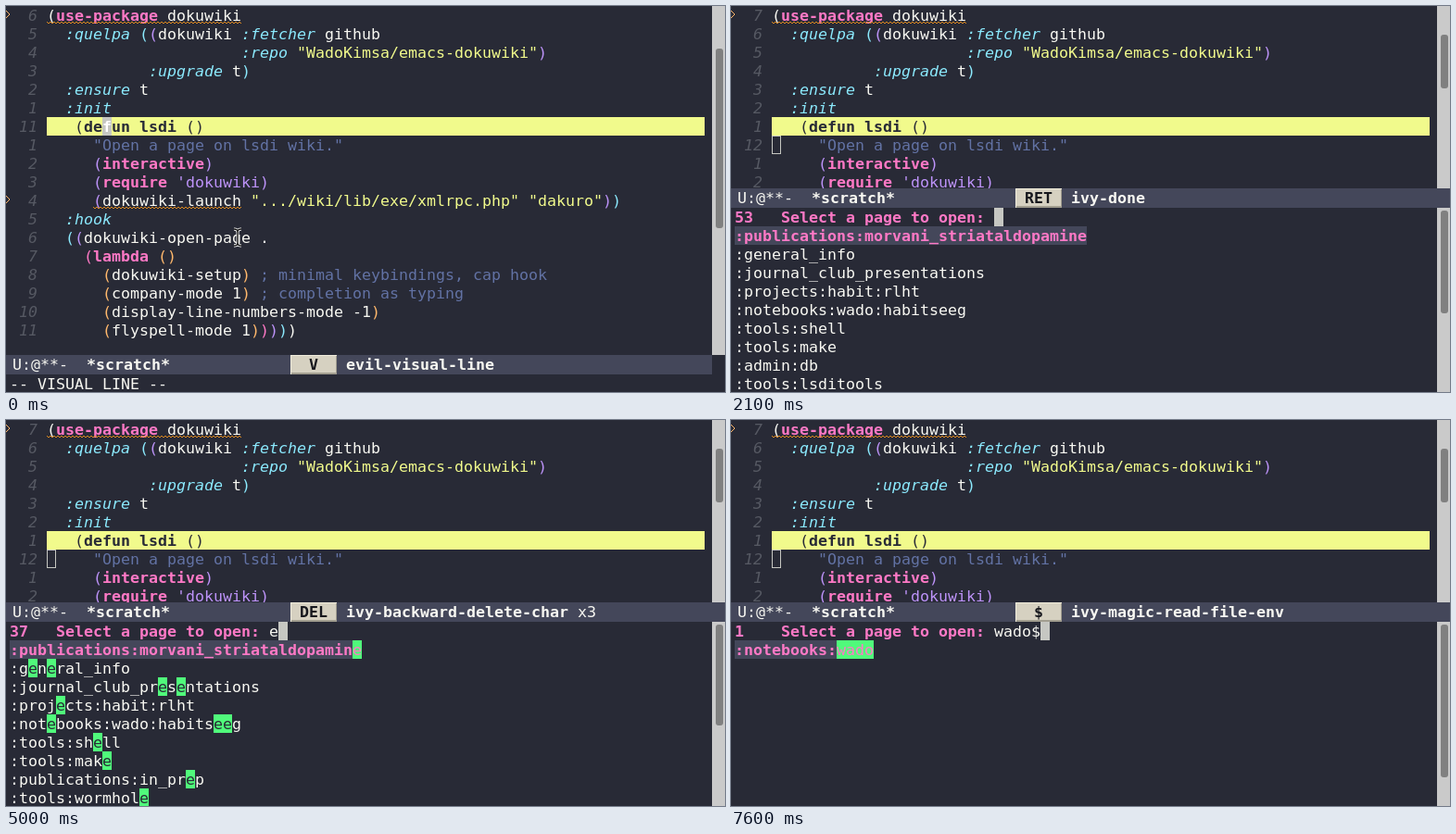
These frames come from a looping animation (776x417 px, 8 s). An HTML page with a canvas:

```html
<!DOCTYPE html>
<html lang="en">
<head>
<meta charset="utf-8">
<title>Wiki pages from the editor</title>
<style>
  html, body { margin: 0; width: 776px; height: 417px; overflow: hidden; background: #282a36; }
  canvas { display: block; }
</style>
</head>
<body>
<canvas id="stage" width="776" height="417"></canvas>
<script>
const ctx = document.getElementById('stage').getContext('2d');
const LOOP = 8000, CELL = 10, ROW = 20;
const C = {
  bg: '#282a36', fg: '#f8f8f2', line: '#44475a', pink: '#ff79c6', cyan: '#8be9fd',
  purple: '#bd93f9', orange: '#ffb86c', yellow: '#f1fa8c', green: '#50fa7b',
  comment: '#6272a4', number: '#565963', cursor: '#c6c7c2', wave: '#e08a1e'
};
const RAINBOW = [C.fg, C.cyan, C.purple, C.pink, C.orange];

const code = `(use-package dokuwiki
  :quelpa ((dokuwiki :fetcher github
                     :repo "WadoKimsa/emacs-dokuwiki")
           :upgrade t)
  :ensure t
  :init
   (defun lsdi ()
     "Open a page on lsdi wiki."
     (interactive)
     (require 'dokuwiki)
     (dokuwiki-launch ".../wiki/lib/exe/xmlrpc.php" "dakuro"))
  :hook
  ((dokuwiki-open-page .
    (lambda ()
      (dokuwiki-setup) ; minimal keybindings, cap hook
      (company-mode 1) ; completion as typing
      (display-line-numbers-mode -1)
      (flyspell-mode 1)))))`.split('\n');
const REGION = 6, DOC = 7;

const commands = `lh-knight/body
lispy-beginning-of-defun
lispy--ediff-regions
lispy-splice
lispy-raise-some
lispy-unbind-variable
lsp-signature-stop
lispy-describe-bindings-C-4
lispy-mark-symbol (M-m)
lispy-describe-inline
lsp-describe-session
lsp-find-definition
lsp-find-declaration
lsp-describe-thing-at-point
lsdi`.split('\n');

const pages = `:publications:morvani_striataldopamine
:general_info
:journal_club_presentations
:projects:habit:rlht
:notebooks:wado:habitseeg
:tools:shell
:tools:make
:admin:db
:tools:lsditools
:publications:in_prep
:tools:wormhole
:admin:website:wiki
:wiki:dokuwiki
:wiki:syntax
:admin:website:wordpress
:admin:website
:notebooks:wado:zilonk_bastovary_eyetracking_in_quorba
:notebooks:wado
:wiki:welcome`.split('\n');

const SELF = 'self-insert-command', DEL = 'ivy-backward-delete-char';
const step = (time, key, command, extra) => ({ time, key, command, ...extra });
const pick = (time, key, command, prompt, query, count, thumb, repeat = '') =>
  step(time, key, command, { prompt, query, count, thumb, repeat });
const MX = 'M-x ', OPEN = 'Select a page to open: ';
const HOST = 'Contacting host: wiki.example:443';

const steps = [
  step(0, 'V', 'evil-visual-line', { echo: '-- VISUAL LINE --' }),
  pick(600, 'M-x', 'counsel-M-x', MX, '^', 7351, 334),
  pick(900, 'l', SELF, MX, '^l', 402, 336),
  pick(1000, 's', SELF, MX, '^ls', 316, 335),
  pick(1100, 'd', SELF, MX, '^lsd', 87, 333),
  pick(1200, 'i', SELF, MX, '^lsdi', 46, 331),
  step(1600, 'i', SELF, { message: '', thumb: 331 }),
  step(1700, 'i', SELF, { message: HOST, thumb: 331 }),
  step(1900, 'RET', 'ivy-done', { echo: HOST }),
  step(2000, 'RET', 'ivy-done', { echo: '' }),
  pick(2100, 'RET', 'ivy-done', OPEN, '', 53, 332),
  pick(3900, 'e', SELF, OPEN, 'e', 37, 330),
  pick(4000, 'm', SELF, OPEN, 'em', 0, 396),
  pick(4200, 'a', SELF, OPEN, 'ema', 0, 396),
  pick(4300, 'c', SELF, OPEN, 'emac', 0, 396),
  pick(4700, 'DEL', DEL, OPEN, 'ema', 0, 396),
  pick(4900, 'DEL', DEL, OPEN, 'em', 0, 396, 'x2'),
  pick(5000, 'DEL', DEL, OPEN, 'e', 37, 330, 'x3'),
  pick(5200, 'DEL', DEL, OPEN, '', 53, 332, 'x4'),
  pick(6400, 'w', SELF, OPEN, 'w', 10, 328),
  pick(6600, 'a', SELF, OPEN, 'wa', 3, 354),
  pick(6700, 'd', SELF, OPEN, 'wad', 3, 354),
  pick(7300, 'o', SELF, OPEN, 'wado', 3, 355),
  pick(7600, '$', 'ivy-magic-read-file-env', OPEN, 'wado$', 1, 386)
];
const blinkOff = [[400, 600], [3700, 3900], [5600, 6200]];

function box(color, x, y, w, h) {
  ctx.fillStyle = color;
  ctx.fillRect(x, y, w, h);
}

// Writes text on the character grid; y is the top of the row.
function put(text, x, y, color = C.fg, style = '') {
  ctx.font = `${style} 16.6px "DejaVu Sans Mono", "Noto Sans Mono", monospace`;
  ctx.fillStyle = color;
  [...text].forEach((ch, i) => ch !== ' ' && ctx.fillText(ch, x + i * CELL, y + 16));
}

function wave(x0, x1, y) {
  ctx.strokeStyle = C.wave;
  ctx.beginPath();
  for (let x = x0; x <= x1; x += 2) ctx.lineTo(x, y + ((x - x0) % 4 ? 1 : -1));
  ctx.stroke();
}

function fringeArrow(y) {
  ctx.strokeStyle = C.orange;
  ctx.beginPath();
  ctx.moveTo(0, y - 4);
  ctx.lineTo(4, y);
  ctx.lineTo(0, y + 4);
  ctx.stroke();
}

function scrollBar(top, bottom, from, to) {
  box('#cacaca', 762, top, 14, bottom - top);
  ctx.fillStyle = '#808080';
  ctx.beginPath();
  ctx.roundRect(766, from, 8, to - from, 3);
  ctx.fill();
}

function drawCode(point) {
  let depth = 0;
  code.forEach((text, row) => {
    const y = row * ROW, dark = row === REGION;
    if (dark) box(C.yellow, 44, y, 710, ROW);
    const number = row === point ? point + 5 : Math.abs(row - point);
    put(String(number).padStart(2), 14, y, C.number, 'italic');
    for (const { 0: token, index } of text.matchAll(/"[^"]*"|;.*|:[a-z]+|[()]|[^\s():;"]+/g)) {
      let color = C.fg, style = '';
      if (token === '(') color = RAINBOW[depth++];
      else if (token === ')') color = RAINBOW[--depth];
      else if (token[0] === '"') color = row === DOC ? C.comment : C.yellow;
      else if (token[0] === ';') color = C.comment;
      else if (token[0] === "'") color = C.purple;
      else if (token[0] === ':') [color, style] = [C.cyan, 'italic'];
      else if (/^(use-package|interactive|require|lambda)$/.test(token)) [color, style] = [C.pink, 'bold'];
      if (dark) [color, style] = [C.bg, /\w/.test(token) ? 'bold' : ''];
      put(token, 44 + index * CELL, y, color, style);
    }
  });
  wave(44, 254, 18);
  wave(94, 254, 218);
  fringeArrow(9);
  fringeArrow(209);
}

function drawModeLine(y, { key, command, repeat }) {
  box(C.line, 0, y, 762, 21);
  put('U:@**-', 7, y);
  put('*scratch*', 87, y, C.fg, 'bold');
  box('#f0ecdc', 307, y, 50, 21);
  box('#a29e90', 308, y + 1, 49, 20);
  box('#d6d1c1', 308, y + 1, 48, 18);
  put(key, key.length > 1 ? 317 : 327, y, '#16171d', 'bold');
  put(command, 367, y, C.fg, 'bold');
  if (repeat) put(repeat, 377 + command.length * CELL, y);
}

// Positions of the matched characters, or null when the text does not match.
function match(text, query) {
  const hits = new Set();
  if (query[0] === '^') {
    let at = -1;
    for (const ch of query.slice(1)) {
      at = text.indexOf(ch, at + 1);
      if (at < 0) return null;
      hits.add(at);
    }
  } else if (query) {
    for (const m of text.matchAll(new RegExp(query, 'g')))
      for (let i = 0; i < m[0].length; i++) hits.add(m.index + i);
    if (!hits.size) return null;
  }
  return hits;
}

function drawPicker({ prompt, query, count }, cursorOn) {
  const head = String(count).padEnd(5) + prompt, end = 4 + head.length * CELL;
  put(head, 4, 218, C.pink, 'bold');
  put(query, end, 218);
  if (cursorOn) box(C.cursor, end + query.length * CELL, 218, CELL, ROW);
  const exact = query.slice(1);
  const rows = (prompt === MX ? commands : pages).filter(text => match(text, query));
  if (prompt === MX) rows.sort((a, b) => (b === exact) - (a === exact));
  rows.slice(0, 9).forEach((text, row) => {
    const y = 238 + row * ROW, selected = !row, hits = match(text, query), binding = text.indexOf('(');
    if (selected) box(C.line, 4, y, text.length * CELL, ROW);
    [...text].forEach((ch, i) => {
      const x = 4 + i * CELL, hit = hits.has(i);
      const bound = binding > 0 && i > binding && ch !== ')';
      if (hit) box(C.green, x, y, CELL, ROW);
      put(ch, x, y, selected || bound ? C.pink : hit ? C.bg : C.fg, selected && !hit || bound ? 'bold' : '');
    });
  });
}

function drawPointer(x, y) {
  for (const [color, width] of [['#fff', 3], ['#111', 1.4]]) {
    ctx.strokeStyle = color;
    ctx.lineWidth = width;
    ctx.beginPath();
    ctx.moveTo(x - 4, y - 9);
    ctx.quadraticCurveTo(x, y - 9, x, y - 6);
    ctx.lineTo(x, y + 6);
    ctx.quadraticCurveTo(x, y + 9, x - 4, y + 9);
    ctx.moveTo(x + 4, y - 9);
    ctx.quadraticCurveTo(x, y - 9, x, y - 6);
    ctx.moveTo(x, y + 6);
    ctx.quadraticCurveTo(x, y + 9, x + 4, y + 9);
    ctx.stroke();
  }
  ctx.lineWidth = 1;
}

function draw(t) {
  const state = steps.findLast(s => s.time <= t);
  const cursorOn = !blinkOff.some(([from, to]) => t >= from && t < to);
  const visual = t < 600, wide = 'echo' in state;
  box(C.bg, 0, 0, 776, 417);
  drawCode(visual ? REGION : DOC);

  if (visual) {
    if (cursorOn) {
      box(C.cursor, 104, 120, CELL, ROW);
      put('f', 104, 120, '#fff', 'bold');
    }
    drawPointer(250, 250);
  } else {
    ctx.strokeStyle = C.cursor;
    ctx.strokeRect(44.5, 140.5, 9, 19);
  }

  if (wide) {
    scrollBar(0, 377, 46, 240);
    drawModeLine(377, state);
    put(state.echo, 4, 398);
    return;
  }
  box(C.bg, 0, 197, 776, 220);
  scrollBar(0, 197, 31, 89);
  scrollBar(218, 417, 221, state.thumb);
  drawModeLine(197, state);
  box(C.line, 762, 197, 14, 21);
  if ('message' in state) put(state.message, 4, 218);
  else drawPicker(state, cursorOn);
}

function tick() {
  draw(performance.now() % LOOP);
  requestAnimationFrame(tick);
}
tick();
</script>
</body>
</html>
```
